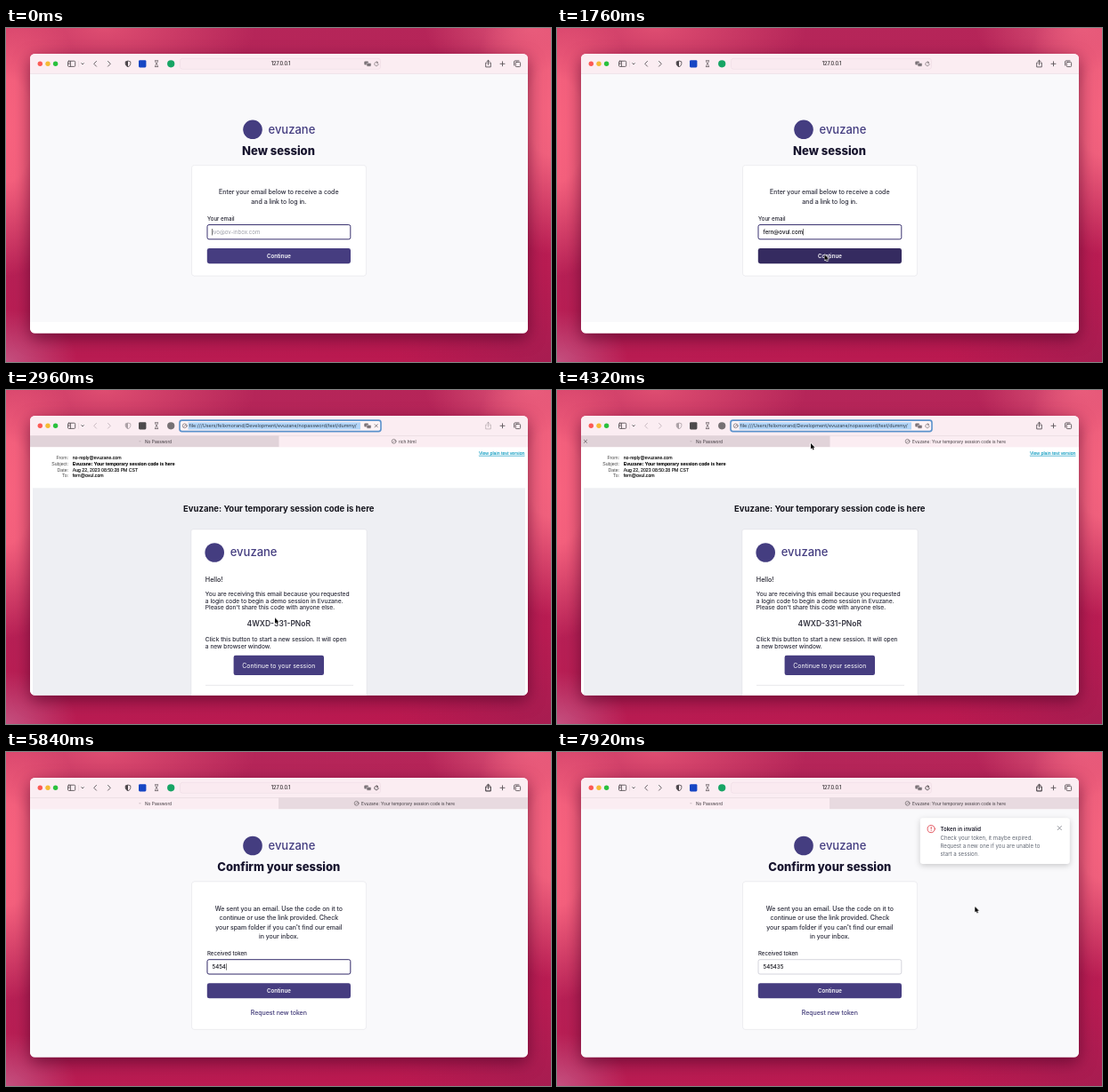
These frames come from a looping animation (612x376 px, 8000 ms). An HTML page:

```html
<!DOCTYPE html>
<html lang="en">
<head>
<meta charset="utf-8">
<title>Session login</title>
<style>
  html, body { margin: 0; width: 100%; height: 100%; overflow: hidden; }
  body {
    background:
      radial-gradient(ellipse 80px 60px at 0 376px, #c4507f, #c4507f00),
      radial-gradient(ellipse 90px 165px at 0 115px, #f8637f, #f4607d 35%, #f4607d00),
      radial-gradient(ellipse 170px 75px at 110px 0, #de4d71, #de4d7100),
      radial-gradient(ellipse 90px 160px at 612px 95px, #f4637f, #f0607d 30%, #f0607d00),
      radial-gradient(ellipse 120px 60px at 590px 0, #e0587a, #e0587a00),
      radial-gradient(ellipse 170px 110px at 612px 376px, #98205290, #98205200),
      linear-gradient(170deg, #b5275a, #b62156 50%, #bb184f);
  }
  svg { display: block; width: 612px; height: 376px; font-family: Inter, sans-serif; }
  .shadow { filter: drop-shadow(0 6px 9px #3c002090); }
  text { white-space: pre; }
  .mid { text-anchor: middle; }
  .head { font-size: 13px; font-weight: 800; fill: #17142e; }
  .body { font-size: 7px; fill: #262736; stroke: #262736; stroke-width: .12; }
  .mail { font-size: 6.65px; fill: #262736; stroke: #262736; stroke-width: .1; }
  .label { font-size: 6.1px; font-weight: 500; fill: #20202e; }
  .input { font-size: 6.1px; font-weight: 500; fill: #0c0c14; }
  .hint { font-weight: 400; fill: #9a9ca6; }
  .cta { font-size: 6.1px; font-weight: 600; fill: #fff; }
  .note { font-size: 6.1px; fill: #626874; }
  .tab { font-size: 4.8px; fill: #3d373c; }
  .url { font-size: 5.7px; fill: #2e2a2d; stroke: #2e2a2d; stroke-width: .1; }
  .meta { font: 5.2px "Liberation Sans", sans-serif; fill: #000; stroke: #000; stroke-width: .1; }
  .key { text-anchor: end; fill: #444; stroke: none; }
  .link { text-anchor: end; fill: #0f9cc0; stroke: #0f9cc0; text-decoration: underline; }
  .card { fill: #fff; stroke: #e9e9ee; stroke-width: .6; filter: drop-shadow(0 .5px .6px #00000016); }
  .line { fill: none; stroke: #5b5458; stroke-width: .9; stroke-linecap: round; stroke-linejoin: round; }
  .box { fill: #fff; stroke: #c9cad3; stroke-width: .8; }
  .ring { fill: #fff; stroke: #3b3370; stroke-width: 1; }
  .btn { fill: #463d80; }

  .start, .mailbox, .confirm, .local, .tabs, .loading, .loaded, .focus2,
  .hover1, .hover2, .toast, .pointer, .closer { animation: 8s infinite step-end; }
  .start { animation-name: start; }
  .mailbox { animation-name: mailbox; }
  .confirm { animation-name: confirm; }
  .local { animation-name: local; }
  .tabs { animation-name: tabs; }
  .loading { animation-name: loading; }
  .loaded { animation-name: loaded; }
  .closer { animation-name: closer; }
  .hover1 { animation-name: hover1; }
  .hover2 { animation-name: hover2; }
  .focus2 { animation-name: focus2; }
  .toast { animation-name: toast; animation-timing-function: ease-out; }
  .pointer { animation-name: pointer, seen; animation-timing-function: ease-in-out, step-end; }

  @keyframes start { 0% { visibility: visible } 35%, 100% { visibility: hidden } }
  @keyframes mailbox { 0% { visibility: hidden } 35% { visibility: visible } 55%, 100% { visibility: hidden } }
  @keyframes confirm { 0% { visibility: hidden } 55%, 100% { visibility: visible } }
  @keyframes local { 0% { visibility: visible } 35% { visibility: hidden } 55%, 100% { visibility: visible } }
  @keyframes tabs { 0% { visibility: hidden } 35%, 100% { visibility: visible } }
  @keyframes loading { 0% { visibility: hidden } 35% { visibility: visible } 39%, 100% { visibility: hidden } }
  @keyframes loaded { 0% { visibility: hidden } 39%, 100% { visibility: visible } }
  @keyframes closer { 0% { visibility: hidden } 52% { visibility: visible } 55%, 100% { visibility: hidden } }
  @keyframes hover1 { 0% { fill: #463d80 } 20.5%, 100% { fill: #352b60 } }
  @keyframes hover2 { 0% { fill: #463d80 } 82% { fill: #352b60 } 92%, 100% { fill: #463d80 } }
  @keyframes focus2 { 0% { visibility: hidden } 65% { visibility: visible } 89.5%, 100% { visibility: hidden } }
  @keyframes toast {
    0%, 89.5% { opacity: 0; transform: translateX(4px) }
    93%, 100% { opacity: 1; transform: none }
  }
  @keyframes seen {
    0% { visibility: hidden } 17% { visibility: visible }
    67.5% { visibility: hidden } 78%, 100% { visibility: visible }
  }
  @keyframes pointer {
    0%, 17% { transform: translate(322px, 292px) }
    21.5%, 34% { transform: translate(300.5px, 255px) }
    36%, 44% { transform: translate(302px, 256.5px) }
    53%, 55.5% { transform: translate(285px, 60px) }
    60%, 60.6% { transform: translate(304px, 226.5px) }
    64%, 78% { transform: translate(300px, 240px) }
    83%, 90.5% { transform: translate(309.7px, 269px) }
    98%, 100% { transform: translate(469.3px, 174px) }
  }
</style>
</head>
<body>
<svg viewBox="0 0 612 376">
  <defs>
    <clipPath id="frame"><rect x="27" y="29" width="559" height="314.5" rx="5.5"/></clipPath>
    <clipPath id="field"><rect x="204" y="35" width="194" height="11"/></clipPath>
    <g id="brand">
      <circle r="10.8" fill="#443d80"/>
      <text x="17.5" y="4.3" font-size="13" font-weight="500" fill="#443d80">evuzane</text>
    </g>
    <g id="compass" class="line" style="stroke-width:.6">
      <circle r="2.4"/><path d="M-1 1L1 -1"/>
    </g>
    <path id="cross" class="line" d="M-1.6-1.6L1.6 1.6M1.6-1.6L-1.6 1.6" style="stroke-width:.7"/>
    <path id="reload" class="line" d="M1.6-1.3A2.2 2.2 0 1 0 2.2 .4M.2-2.5L1.7-1.4L.3-.1" style="stroke-width:.6"/>
    <path id="share" class="line" d="M-1.3-1.2H-2.8V3.6H2.8V-1.2H1.3M0 1V-4M-1.5-2.6L0-4.1L1.5-2.6"/>
    <path id="arrows" d="M101.5 37.4L98.7 40.3L101.5 43.2M114.5 37.4L117.3 40.3L114.5 43.2"/>
    <g id="shield">
      <path d="M0-3.3L2.8-2.4V.3Q2.6 2.4 0 3.5Q-2.6 2.4-2.8 .3V-2.4Z" fill="none" stroke="currentColor" stroke-width=".8"/>
      <path d="M0-3.3V3.5Q-2.6 2.4-2.8 .3V-2.4Z" fill="currentColor"/>
    </g>
  </defs>

  <rect class="shadow" x="27" y="29" width="559" height="314.5" rx="5.5" fill="#fbedf2"/>

  <g clip-path="url(#frame)">
    <rect x="27" y="29" width="559" height="36" fill="#fbedf2"/>

    <!-- toolbar -->
    <circle cx="38.3" cy="40.3" r="2.7" fill="#fb5a55"/>
    <circle cx="47" cy="40.3" r="2.7" fill="#f4bb35"/>
    <circle cx="55.6" cy="40.3" r="2.7" fill="#2ac13e"/>
    <g class="line">
      <rect x="69.5" y="37.2" width="8.2" height="6.2" rx="1.1"/>
      <path d="M72.4 37.4V43.2M70.6 39H71.2M70.6 40.4H71.2"/>
      <path d="M84.7 39.7L86 41L87.3 39.7"/>
      <path d="M555 40.3H560M557.5 37.8V42.8"/>
      <rect x="572.2" y="38.4" width="5.4" height="5.2" rx="1"/>
      <path d="M570.6 42V38Q570.6 36.9 571.7 36.9H576"/>
      <path d="M167.3 36.8H170.7M167.3 43.6H170.7M167.8 37V38.4L169 40.2L170.2 38.4V37M167.8 43.4V42L169 40.2L170.2 42V43.4" style="stroke-width:.7"/>
    </g>
    <path d="M81.5 37V44" stroke="#e3d3da" stroke-width=".6"/>

    <g class="local">
      <use class="line" href="#arrows"/>
      <use href="#shield" x="137" y="40.3" color="#4a4448"/>
      <rect x="149" y="36.2" width="8.4" height="8.2" rx="1.3" fill="#1746c4"/>
      <circle cx="185.2" cy="40.3" r="4.1" fill="#18a565"/>
      <rect x="195.5" y="34.3" width="225" height="12" rx="2.6" fill="#faeaf0" stroke="#ecdbe3" stroke-width=".6"/>
      <text class="url mid" x="308.5" y="42.4">127.0.0.1</text>
      <use href="#reload" x="416" y="40.3"/>
      <use href="#share" x="541.5" y="40.3"/>
    </g>

    <g class="mailbox">
      <use class="line" href="#arrows" style="stroke:#c4b6bd"/>
      <use href="#shield" x="137" y="40.3" color="#aaa0a5"/>
      <rect x="149" y="36.2" width="8.4" height="8.2" rx="1.3" fill="#4d4a4c"/>
      <circle cx="185.2" cy="40.3" r="4.1" fill="#767174"/>
      <rect x="195" y="34.1" width="226" height="12.5" rx="2.6" fill="#fdf3f6" stroke="#5b92cc" stroke-width="1.6"/>
      <use href="#compass" x="200.7" y="40.3"/>
      <rect x="204.5" y="36.3" width="193.5" height="8.2" fill="#b2d5f8"/>
      <text x="205.5" y="42.3" font-size="5.4" fill="#2a3440" clip-path="url(#field)">file:///Users/felixmorand/Development/evuzane/nopassword/test/dummy/</text>
    </g>
    <g class="loading">
      <use href="#cross" x="415.7" y="40.3"/>
      <use href="#share" x="541.5" y="40.3" opacity=".35"/>
    </g>
    <g class="loaded">
      <use href="#reload" x="416" y="40.3"/>
      <use href="#share" x="541.5" y="40.3"/>
    </g>
    <g fill="#7a7277">
      <rect x="402.3" y="37.6" width="4.6" height="3.8" rx="1"/>
      <rect x="405" y="39.4" width="5" height="3.9" rx="1" stroke="#fbedf2" stroke-width=".5"/>
    </g>

    <!-- first page -->
    <g class="start">
      <rect x="27" y="51.5" width="559" height="280" fill="#f9f9fb"/>
      <rect x="27" y="331" width="559" height="13" fill="#fff"/>
      <path d="M27 51.5H586" stroke="#eadbe2" stroke-width=".6"/>
      <use href="#brand" x="277" y="114.3"/>
      <text class="head mid" x="306" y="143">New session</text>
      <rect class="card" x="208.6" y="154.6" width="195.8" height="124.4" rx="3"/>
      <text class="body mid" x="306.3" y="187">Enter your email below to receive a code</text>
      <text class="body mid" x="306.3" y="197.6">and a link to log in.</text>
      <text class="label" x="226" y="217.2">Your email</text>
      <rect class="ring" x="226" y="221.5" width="160.8" height="16.3" rx="2"/>
      <text class="input" id="mail" x="231.5" y="231.9"></text>
      <rect id="caret1" y="226" width=".6" height="7.4" fill="#222"/>
      <rect class="btn hover1" x="225.8" y="248" width="161.2" height="17.2" rx="2.4"/>
      <text class="cta mid" x="306.4" y="258.9">Continue</text>
    </g>

    <!-- tab strip -->
    <g class="tabs">
      <rect x="27" y="51.5" width="559" height="13" fill="#fbedf2"/>
      <rect class="mailbox" x="27" y="51.5" width="279.5" height="13" fill="#e1d3d9"/>
      <rect class="confirm" x="306" y="51.5" width="280" height="13" fill="#e8dae0"/>
      <path d="M27 51.6H586" stroke="#dfcfd6" stroke-width=".5"/>
      <path d="M149.4 57.8H151.4" stroke="#b5a6ad" stroke-width=".7"/>
      <text class="tab" x="156" y="59.6">No Password</text>
    </g>
    <g class="loading">
      <use href="#compass" x="435.6" y="57.8"/>
      <text class="tab" x="440.8" y="59.6">rich.html</text>
    </g>
    <g class="loaded">
      <use href="#compass" x="393.6" y="57.8"/>
      <text class="tab" x="399" y="59.6">Evuzane: Your temporary session code is here</text>
    </g>
    <use class="closer" href="#cross" x="32" y="57.8"/>

    <!-- message -->
    <g class="mailbox">
      <rect x="27" y="64.3" width="559" height="280" fill="#fff"/>
      <g class="meta">
        <text class="key" x="70" y="78.4">From:</text><text x="74.7" y="78.4">no-reply@evuzane.com</text>
        <text class="key" x="70" y="85">Subject:</text><text x="74.7" y="85" font-weight="700">Evuzane: Your temporary session code is here</text>
        <text class="key" x="70" y="91.5">Date:</text><text x="74.7" y="91.5">Aug 22, 2023 08:50:28 PM CST</text>
        <text class="key" x="70" y="98">To:</text><text x="74.7" y="98">fern@ovul.com</text>
        <text class="link" x="582.5" y="72.9">View plain test version</text>
      </g>
      <rect x="30" y="110.3" width="553" height="234" fill="#eeeff3"/>
      <text class="mid" x="306.3" y="136.9" font-size="9.5" font-weight="700" fill="#14141c">Evuzane: Your temporary session code is here</text>
      <rect class="card" x="208" y="157" width="197" height="200" rx="2"/>
      <use href="#brand" x="234.2" y="183"/>
      <text x="223.8" y="216.2" font-size="7.2" font-weight="500" fill="#22222e">Hello!</text>
      <g class="mail">
        <text x="223.8" y="231.7">You are receiving this email because you requested</text>
        <text x="223.8" y="239.5">a login code to begin a demo session in Evuzane.</text>
        <text x="223.8" y="247.3">Please don't share this code with anyone else.</text>
        <text x="223.8" y="283">Click this button to start a new session. It will open</text>
        <text x="223.8" y="290.8">a new browser window.</text>
      </g>
      <text class="mid" x="306.3" y="266" font-size="8.5" font-weight="600" fill="#33333f">4WXD-331-PNoR</text>
      <rect class="btn" x="255.6" y="298.7" width="101.4" height="22.3" rx="2.2"/>
      <text class="mid" x="306.3" y="312.6" font-size="7" fill="#fff">Continue to your session</text>
      <path d="M224 332.4H390" stroke="#e2e2e6" stroke-width=".8"/>
    </g>

    <!-- second page -->
    <g class="confirm">
      <rect x="27" y="64.3" width="559" height="280" fill="#f9f9fb"/>
      <use href="#brand" x="277" y="105.5"/>
      <text class="head mid" x="306.3" y="134.2">Confirm your session</text>
      <rect class="card" x="208.6" y="146" width="195.8" height="166.3" rx="3"/>
      <g class="body mid">
        <text x="306.3" y="178.5">We sent you an email. Use the code on it to</text>
        <text x="306.3" y="189">continue or use the link provided. Check</text>
        <text x="306.3" y="199.5">your spam folder if you can't find our email</text>
        <text x="306.3" y="210">in your inbox.</text>
      </g>
      <text class="label" x="226" y="229.4">Received token</text>
      <rect class="box" x="226" y="233.7" width="160.8" height="16.3" rx="2"/>
      <rect class="ring focus2" x="226" y="233.7" width="160.8" height="16.3" rx="2"/>
      <text class="input" id="token" x="231.5" y="244.1"></text>
      <rect id="caret2" y="238.2" width=".6" height="7.4" fill="#222"/>
      <rect class="btn hover2" x="225.8" y="260.3" width="161.2" height="17" rx="2.4"/>
      <text class="cta mid" x="306.4" y="271.1">Continue</text>
      <text class="body mid" x="306.3" y="295.5" style="fill:#3b3474;stroke:#3b3474">Request new token</text>
      <g class="toast">
        <rect x="407.8" y="74.2" width="168" height="51.8" rx="3.2" fill="#fff" style="filter:drop-shadow(0 2px 3px #00000030)"/>
        <g fill="none" stroke="#e0454f" stroke-width=".9" stroke-linecap="round">
          <circle cx="420.2" cy="86.6" r="4.1"/><path d="M420.2 84.4V86.9M420.2 88.6V88.7"/>
        </g>
        <text class="label" x="430.5" y="88.7" style="font-weight:600">Token in invalid</text>
        <text class="note" x="430.5" y="99.2">Check your token, it maybe expired.</text>
        <text class="note" x="430.5" y="107.9">Request a new one if you are unable to</text>
        <text class="note" x="430.5" y="116.6">start a session.</text>
        <path class="line" d="M562.2 83.5L566.4 87.7M566.4 83.5L562.2 87.7" style="stroke:#85878f"/>
      </g>
    </g>
  </g>

  <path class="pointer" d="M0 0V6.4L1.5 5.1L2.5 7.5L3.6 7L2.6 4.7H4.6Z" fill="#000" stroke="#fff" stroke-width="1.3" paint-order="stroke" stroke-linejoin="round"/>
</svg>
<script>
  const LOOP = 8000;
  const byId = id => document.getElementById(id);
  const fields = [
    { text: byId('mail'), caret: byId('caret1'), value: 'fern@ovul.com', hint: 'ivo@ov-inbox.com',
      from: 240, step: 80, caretOn: 0, caretOff: 2800 },
    { text: byId('token'), caret: byId('caret2'), value: '545435', hint: '4646-39103-0867',
      from: 5440, step: 130, caretOn: 5200, caretOff: 6480 }
  ];

  function type(f, t) {
    const count = t < f.from ? 0 : Math.min(f.value.length, Math.floor((t - f.from) / f.step) + 1);
    const shown = count ? f.value.slice(0, count) : f.hint;
    if (f.text.textContent !== shown) f.text.textContent = shown;
    f.text.classList.toggle('hint', !count);
    f.caret.setAttribute('x', 231.3 + (count ? f.text.getComputedTextLength() + .4 : 0));
    f.caret.setAttribute('opacity', t >= f.caretOn && t < f.caretOff ? 1 : 0);
  }

  let begin = null;
  function draw(now) {
    begin ??= now;
    const t = (now - begin) % LOOP;
    fields.forEach(f => type(f, t));
    requestAnimationFrame(draw);
  }
  fields.forEach(f => type(f, 0));
  requestAnimationFrame(draw);
</script>
</body>
</html>
```
